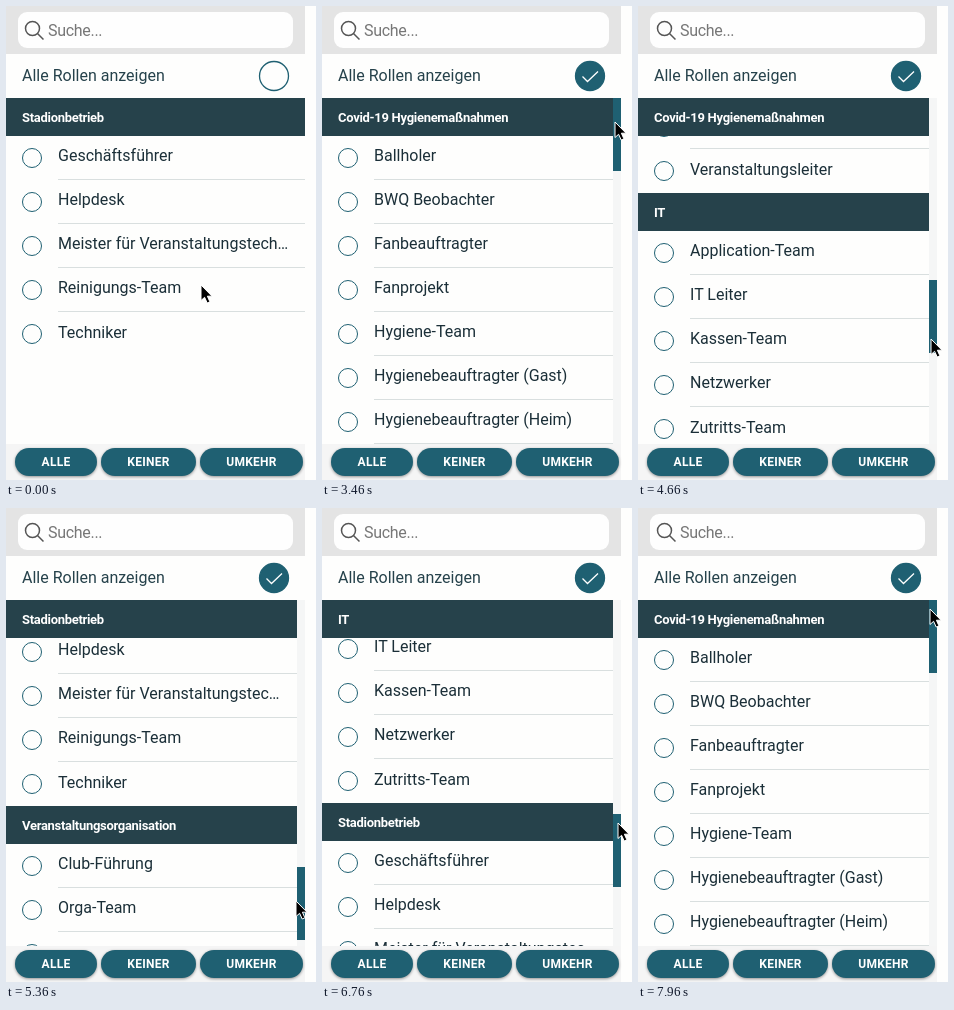
An HTML page for the animation above (8000 ms loop, 310 by 474 pixels).

```html
<!DOCTYPE html>
<html lang="de">
<meta charset="utf-8">
<style>
  html, body { margin: 0; width: 100%; height: 100%; overflow: hidden; background: #fefefd; }
  body { position: relative; font: 16px Roboto, sans-serif; color: #1b2f38; }
  body > *, .thumb { position: absolute; }
  .search { width: 299px; height: 48px; background: #e4e4e4; }
  .field { position: absolute; left: 12px; top: 6px; width: 245px; height: 36px; padding-left: 30px;
           border-radius: 9px; background: #fefefe; color: #777; line-height: 38px; letter-spacing: -.3px; }
  .field svg { position: absolute; left: 5px; top: 7px; }
  .all-row { left: 16px; top: 48px; line-height: 44px; color: #26424b; }
  .toggle { left: 252px; top: 54px; }
  .list { top: 92px; width: 299px; height: 346px; overflow: hidden; }
  .all .list { width: 291px; }
  body:not(.all) :is(section:not(.base), .track, #check) { display: none; }
  h2 { position: sticky; top: 0; z-index: 1; margin: 0; height: 38px; padding-left: 16px; background: #26424b;
       color: #fff; font: bold 13px/39px Roboto, sans-serif; letter-spacing: -.3px; }
  .item { position: relative; height: 44px; padding-left: 52px; }
  .item::before { content: ""; position: absolute; left: 16px; top: 12px; width: 18px; height: 18px;
                  border: 1.3px solid #1f6072; border-radius: 50%; }
  .item div { height: 43px; padding-right: 16px; border-bottom: 1px solid #d9dfdf; line-height: 39px;
              white-space: nowrap; overflow: hidden; text-overflow: ellipsis; }
  .item:last-child div { border: 0; line-height: 41px; }
  .track { left: 291px; top: 92px; width: 8px; height: 346px; background: #f5f6f6; }
  .thumb { width: 8px; height: 73px; background: #1f6072; }
  .footer { top: 438px; width: 299px; height: 36px; background: #f5f5f5; }
  .footer b { position: absolute; top: 4px; height: 28px; border-radius: 14px; background: #1f6072; color: #fff;
              box-shadow: 0 1px 3px #0006; font-size: 12px; line-height: 28px; letter-spacing: .25px; text-align: center; }
  .cursor { left: 0; top: 0; overflow: visible; }
</style>
<body>
<div class="search"><div class="field">Suche...
  <svg width="24" height="24" fill="none" stroke="#555" stroke-width="1.5"><circle cx="9.5" cy="9.5" r="7"/><path d="M14.5 14.5L20.5 20.5"/></svg>
</div></div>
<div class="all-row">Alle Rollen anzeigen</div>
<svg class="toggle" width="32" height="32" stroke-width="1.3">
  <circle id="dot" cx="16" cy="16" r="14.5" stroke="#1f6072"/>
  <path id="check" d="M8.5 16.5L13.5 21.5L24 11.5" fill="none" stroke="#fff"/>
</svg>
<div class="list" id="list"></div>
<div class="track"><div class="thumb" id="thumb"></div></div>
<div class="footer">
  <b style="left:9px;width:82px">ALLE</b>
  <b style="left:95px;width:95px">KEINER</b>
  <b style="left:194px;width:103px">UMKEHR</b>
</div>
<svg class="cursor" id="cursor" width="1" height="1">
  <path id="arrow" d="M0 0V15.5L3.6 12.3L6.2 18L8.9 16.8L6.4 11.2H11Z" stroke="#fff"/>
  <path id="hand" d="M-1.8 1Q0 -1.8 1.8 1V6.5Q3.4 5 4.9 7Q6.4 5.8 7.4 7.8Q9.6 7 9.8 9.6V13L7.8 18.5H-.8L-5.8 11.5Q-6.4 9 -4.3 9L-1.8 11ZM1.8 6.5V10M4.9 7V10.5M7.4 8V11M1.2 13V16M3.8 13V16M6.2 13V16" fill="#fff" stroke="#000" stroke-width="1.2"/>
</svg>
<script>
const sections = {
  'Covid-19 Hygienemaßnahmen': 'Ballholer,BWQ Beobachter,Fanbeauftragter,Fanprojekt,Hygiene-Team,Hygienebeauftragter (Gast),Hygienebeauftragter (Heim),Kamera-Team,Mannschaftsarzt,Medien-Team,Ordnungsdienst,Physiotherapeut,Platzwart,Presse,Sanitätsdienst,Schiedsrichter,Spieler,Stadionsprecher,Torwarttrainer,Trainer,Veranstaltungsleiter',
  'IT': 'Application-Team,IT Leiter,Kassen-Team,Netzwerker,Zutritts-Team',
  'Stadionbetrieb': 'Geschäftsführer,Helpdesk,Meister für Veranstaltungstechnik,Reinigungs-Team,Techniker',
  'Veranstaltungsorganisation': 'Club-Führung,Orga-Team,Projektleiter',
};
list.innerHTML = Object.entries(sections).map(([title, roles]) =>
  `<section class="${title === 'Stadionbetrieb' ? 'base' : ''}"><h2>${title}</h2>` +
  roles.split(',').map(role => `<div class="item"><div>${role}</div></div>`).join('') + '</section>').join('');

const LOOP = 8000, TOGGLE_AT = 2300, DRAG_AT = 3570;
const VIEW = 346, CONTENT = 1648, GRAB_Y = 116, LAG = 175;

// Mouse path: time, x, y
const path = [
  [480, 195, 279], [1300, 257, 120], [1880, 266, 72], [2480, 266, 72], [3260, 293, GRAB_Y], [DRAG_AT, 293, GRAB_Y],
  [4225, 299, 242], [4485, 296, 298], [4660, 293, 333], [5185, 291, 383], [5360, 290, 393], [5600, 290, 396],
  [5940, 290, 396], [6585, 295, 329.5], [6760, 296, 315], [7780, 296, 115], [7960, 292, 101],
];

const slope = (i, c) => path[i] && path[i + 1] ? (path[i + 1][c] - path[i][c]) / (path[i + 1][0] - path[i][0]) : 0;
const tangent = (i, c) => {
  const a = slope(i - 1, c), b = slope(i, c);
  return a * b > 0 ? 2 * a * b / (a + b) : 0;
};

// Monotone cubic interpolation of one coordinate
function mouse(t, c) {
  const next = path.findIndex(p => p[0] > t);
  if (next === 0) return path[0][c];
  if (next < 0) return path.at(-1)[c];
  const i = next - 1, span = path[next][0] - path[i][0], u = (t - path[i][0]) / span, v = 1 - u;
  return v * v * (1 + 2 * u) * path[i][c] + u * u * (1 + 2 * v) * path[next][c] +
    span * u * v * (v * tangent(i, c) - u * tangent(next, c));
}

// The list follows the dragged thumb with a short delay
function scrollAt(t) {
  if (t < DRAG_AT) return 0;
  const offset = (mouse(t - LAG, 2) - GRAB_Y) * CONTENT / VIEW;
  return Math.round(Math.max(0, Math.min(CONTENT - VIEW, offset)));
}

function draw(t) {
  const all = t >= TOGGLE_AT, x = Math.round(mouse(t, 1)), y = Math.round(mouse(t, 2));
  const scroll = scrollAt(t), over = Math.hypot(x - 268, y - 70) < 15;
  document.body.classList.toggle('all', all);
  dot.setAttribute('fill', all ? '#1f6072' : 'none');
  list.scrollTop = scroll;
  thumb.style.top = scroll * VIEW / CONTENT + 'px';
  arrow.style.display = over ? 'none' : '';
  hand.style.display = over ? '' : 'none';
  cursor.style.transform = `translate(${x}px, ${y}px)`;
}

// 30 steps per second, rounded down to 10 ms
const step = t => Math.floor(Math.floor((t + 10) * .03) * 10 / 3) * 10;

const start = performance.now();
(function tick() {
  draw(step((performance.now() - start) % LOOP));
  requestAnimationFrame(tick);
})();
</script>
</body>
</html>
```
